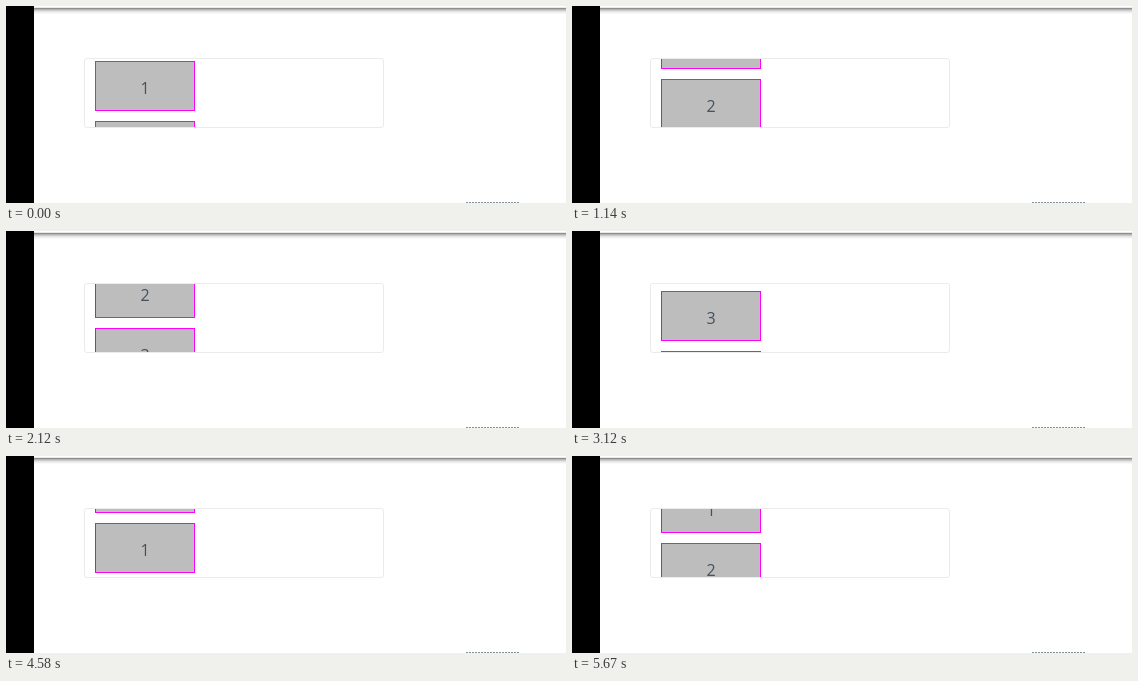
An HTML page that plays this animation: 560 by 197 pixels, repeating every 5.74 s.

```html
<!DOCTYPE html>
<html lang="en">
<head>
<meta charset="utf-8">
<title>Looping vertical list</title>
<style>
  html, body { margin: 0; width: 100%; height: 100%; overflow: hidden; background: #fff; }
  svg { display: block; }
  text { font: 16px "Open Sans", "Noto Sans", sans-serif; fill: #46515c; text-anchor: middle; }
</style>
</head>
<body>
<svg width="560" height="197" viewBox="0 0 560 197">
  <defs>
    <clipPath id="port"><rect x="79" y="53" width="298" height="68"/></clipPath>
    <linearGradient id="shade" x1="0" y1="0" x2="0" y2="1">
      <stop offset="0" stop-color="#a8a8a8"/>
      <stop offset=".5" stop-color="#e4e4e4"/>
      <stop offset="1" stop-color="#fff"/>
    </linearGradient>
  </defs>
  <rect width="560" height="197" fill="#fff"/>
  <rect y="1" width="560" height="1" fill="#e8e8e8"/>
  <rect y="2" width="560" height="1" fill="#8e8e8e"/>
  <rect y="3" width="560" height="5" fill="url(#shade)"/>
  <rect width="28" height="197" fill="#000"/>
  <rect x="78.5" y="52.5" width="299" height="69" rx="2.5" fill="none" stroke="#ebebeb"/>
  <g clip-path="url(#port)"><g id="list"></g></g>
  <path d="M460 196.5H513" stroke="#83929a" stroke-dasharray="2 1"/>
</svg>
<script>
const LOOP = 5740, PITCH = 60, ITEMS = 3, TOP = 55, SPEED = 0.0366;
const list = document.getElementById('list');

// Runs of eight evenly spaced steps: first and last time of each.
const runs = [[70, 600], [680, 1220], [1300, 1810], [1890, 2430], [2510, 3040],
  [3120, 3660], [3740, 4270], [4350, 4900], [4980, 5510], [5590, 6150]];

function add(parent, tag, attrs) {
  const el = document.createElementNS('http://www.w3.org/2000/svg', tag);
  for (const key in attrs) el.setAttribute(key, attrs[key]);
  return parent.appendChild(el);
}

const edges = [];
for (let i = 0; i < ITEMS * 2; i++) {
  const item = add(list, 'g', { transform: `translate(89 ${i * PITCH})` });
  add(item, 'rect', { x: 0.5, y: 0.5, width: 99, height: 49, fill: '#bdbdbd', stroke: '#f0f' });
  edges.push(add(item, 'rect', { y: 1, width: 1, height: 48 }));
  add(item, 'text', { x: 50, y: 33 }).textContent = i % ITEMS + 1;
}

function stepTime(t) {
  const run = runs.findLast(r => r[0] <= t);
  if (!run) return 0;
  const step = (run[1] - run[0]) / 7;
  const n = Math.min(7, Math.floor((t - run[0]) / step + 0.1));
  return run[0] + n * step;
}

function draw(t) {
  const at = stepTime(t);
  const shift = Math.round(at * SPEED + 0.35) % (PITCH * ITEMS);
  list.setAttribute('transform', `translate(0 ${TOP - shift})`);
  for (const edge of edges) edge.setAttribute('fill', at ? '#7c4a80' : '#f0f');
}

const start = performance.now();
function tick() {
  draw((performance.now() - start) % LOOP);
  requestAnimationFrame(tick);
}
draw(0);
requestAnimationFrame(tick);
</script>
</body>
</html>
```
